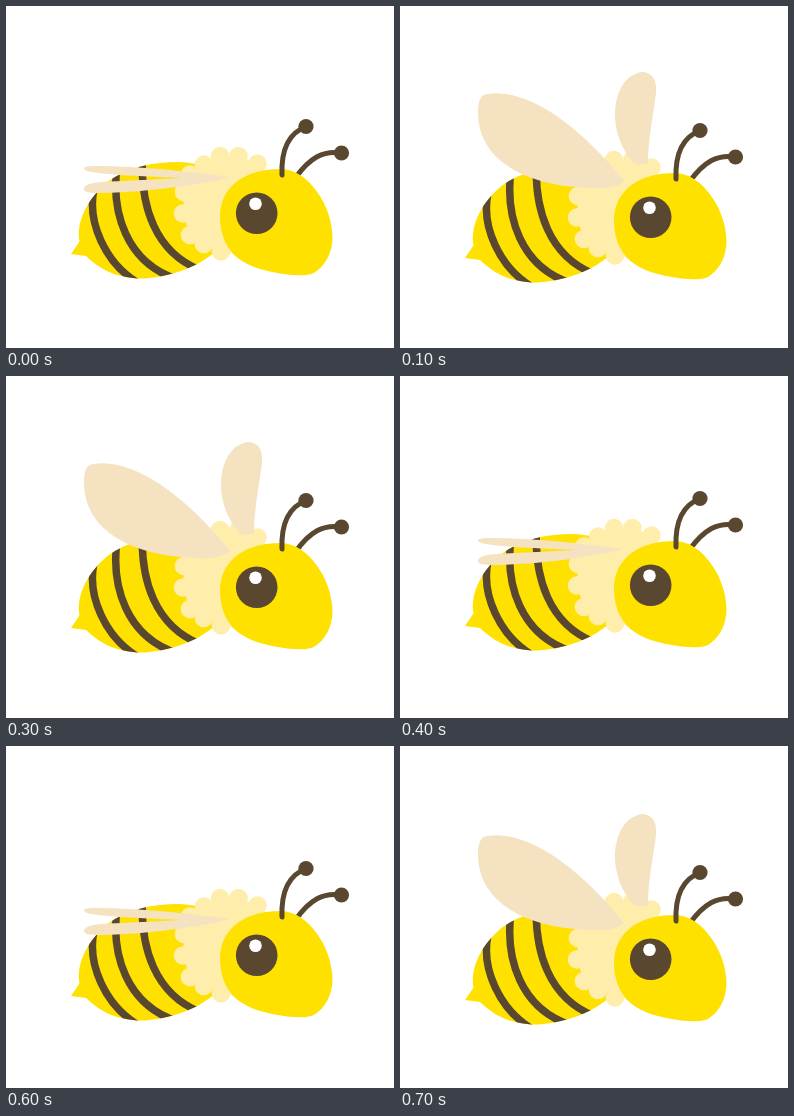
An HTML page with a canvas that plays this animation: 388 by 342 pixels, repeating every 0.8 s.

```html
<!DOCTYPE html>
<html lang="en">
<head>
<meta charset="utf-8">
<title>Bee</title>
<style>
  html, body { margin: 0; width: 100%; height: 100%; overflow: hidden; background: #fff; }
  canvas { display: block; }
</style>
</head>
<body>
<canvas id="stage" width="388" height="342"></canvas>
<script>
const ctx = document.getElementById('stage').getContext('2d');
const YELLOW = '#ffe100', BROWN = '#594730', WING = '#f5e2c1', RUFF = '#ffeeab';
const STEP = 100;
const DROP = [0, 4, 4, 4, 2, 4, 2, 6]; // vertical bob per step

const path = d => new Path2D(d);
const body = path('M65 248L73.5 235.5C70 215 82 192 102 175.5C122 161 148 156 172 156C200 157 222 166 230 185L225 235L207 247.5C191 261 161 273 131 272.5C108 271 92 262 80 250Z');
const stripes = [
  'M88 183C81 216 99 257 132 277',
  'M111 160C105 206 120 257 172 273.5',
  'M136.500 150C134 200 149 246 194 264'
].map(path);
const head = path('M214 211C214 181 238 163 275 163C302 163 326.500 200 326.500 231C326.500 247 319 260 308 267C302 270 291 269.500 281 268.500C264 266 249 263 236 255C221 246 214 229 214 211Z');
const feelers = ['M276 169C275 143 283 127 300 120.500', 'M290 171C304 152 317 144 335.500 147'].map(path);
const wingsUp = [
  'M215 105C215 85 223 66 241 62C252 62 257 69 256 83C253 107 248 129 248 153Q241 156 234 153C224 143 215 124 215 105Z',
  'M78 102C78 92 80 85 87 84C128 77 182 118 224 171C218 178 204 179 190 178C128 176 78 152 78 102Z'
].map(path);
const wingsDown = [
  'M78 162.500C78 160.500 83 160 92 160C132 160 180 165 224 171C206 173 186 172.500 166 171.500C122 169.500 78 168 78 162.500Z',
  'M78 183C78 178 88 176 104 175.500C146 174 185 170 224 171.500C192 178.500 146 186 96 187C82 187 78 186 78 183Z'
].map(path);
const tufts = [
  [251.5, 157.5], [232.5, 150], [214, 150], [198, 158.5], [184, 168.5], [178, 186],
  [177, 207.5], [184, 229], [198, 238], [215, 245.5], [231, 240]
];

function fill(shape, color) {
  ctx.fillStyle = color;
  ctx.fill(shape);
}

function stroke(shape, width) {
  ctx.strokeStyle = BROWN;
  ctx.lineWidth = width;
  ctx.stroke(shape);
}

function dot(x, y, r, color) {
  ctx.fillStyle = color;
  ctx.beginPath();
  ctx.arc(x, y, r, 0, Math.PI * 2);
  ctx.fill();
}

function drawBody() {
  fill(body, YELLOW);
  ctx.save();
  ctx.clip(body);
  stripes.forEach(s => stroke(s, 7.5));
  ctx.restore();
}

function drawRuff() {
  ctx.fillStyle = RUFF;
  ctx.beginPath();
  tufts.forEach(([x, y]) => ctx.lineTo(x, y));
  ctx.fill();
  tufts.forEach(([x, y]) => dot(x, y, 9.3, RUFF));
}

function drawHead() {
  stroke(feelers[1], 5);
  fill(head, YELLOW);
  stroke(feelers[0], 5);
  dot(300, 120.5, 7.6, BROWN);
  dot(335.5, 147, 7.6, BROWN);
  dot(250.7, 207.3, 20.8, BROWN);
  dot(249.5, 197.8, 6.3, '#fff');
}

function draw(now) {
  const step = Math.floor(now / STEP) % DROP.length;
  ctx.fillStyle = '#fff';
  ctx.fillRect(0, 0, 388, 342);
  ctx.save();
  ctx.translate(0, DROP[step]);
  drawBody();
  drawRuff();
  drawHead();
  (step % 2 ? wingsUp : wingsDown).forEach(w => fill(w, WING));
  ctx.restore();
}

ctx.lineCap = 'round';
const start = performance.now();
function tick() {
  draw(performance.now() - start);
  requestAnimationFrame(tick);
}
tick();
</script>
</body>
</html>
```
